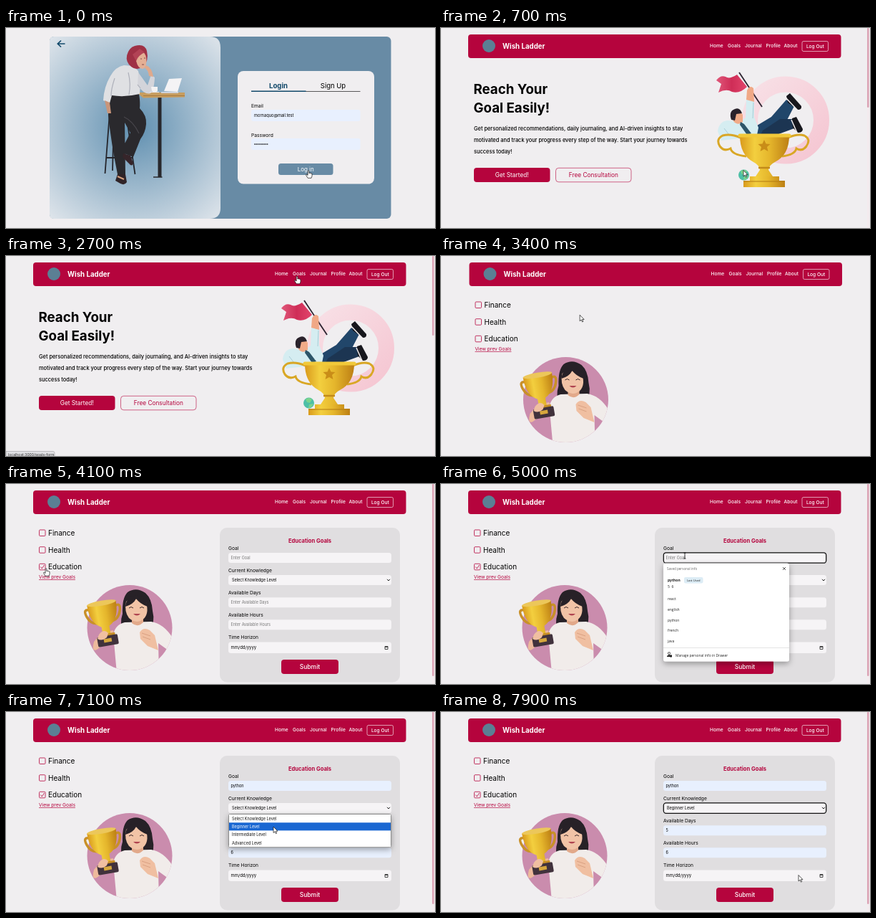
Write an HTML page that moves like this. It is 600 px wide and 279 px high and loops after 8000 ms.

```html
<!DOCTYPE html>
<html lang="en">
<head>
<meta charset="utf-8">
<title>Goal planner walkthrough</title>
<style>
html, body { margin: 0; width: 100%; height: 100%; overflow: hidden; background: #f0eef0; }
svg { display: block; width: 600px; height: 279px; }
text { font-family: Inter, Roboto, sans-serif; fill: #000; white-space: pre; }
.mid { text-anchor: middle; }
.bold { font-weight: 700; }
.nav text { fill: #fff; font-size: 6.6px; font-weight: 500; }
.nav .brand { font-size: 9.7px; font-weight: 700; }
.head { font-size: 18.7px; font-weight: 700; }
.para { font-size: 7.43px; font-weight: 500; }
.btn { font-size: 8.3px; }
.opt { font-size: 10px; }
.label { font-size: 6.65px; }
.value { font-size: 5.5px; }
.hint { fill: #777; }
.popup text { font-family: "Open Sans", "Noto Sans", sans-serif; font-size: 5px; fill: #222; }
.red { fill: #b5043d; }
.wht { fill: #fff; }
</style>
</head>
<body>
<svg viewBox="0 0 600 279">
<defs>
  <radialGradient id="glow" gradientUnits="userSpaceOnUse" cx="180.500" cy="139" r="174">
    <stop offset="0" stop-color="#5f8fb0"/><stop offset="1" stop-color="#dfe5eb"/>
  </radialGradient>
  <linearGradient id="gold">
    <stop offset="0" stop-color="#d99a1c"/><stop offset=".3" stop-color="#f3cf3f"/>
    <stop offset=".6" stop-color="#e5b62c"/><stop offset="1" stop-color="#bd7f14"/>
  </linearGradient>
  <linearGradient id="ring" x1="0" y1="0" x2="1" y2="1">
    <stop offset="0" stop-color="#f8e0e6"/><stop offset="1" stop-color="#f5c6d2"/>
  </linearGradient>
  <linearGradient id="flag">
    <stop offset="0" stop-color="#e0587a"/><stop offset=".5" stop-color="#cf2d57"/><stop offset="1" stop-color="#e2456c"/>
  </linearGradient>
  <filter id="shade" x="-10%" y="-20%" width="120%" height="150%">
    <feDropShadow dx="0" dy="3" stdDeviation="4" flood-color="#000" flood-opacity=".35"/>
  </filter>
  <clipPath id="round"><circle cx="173" cy="200.5" r="59.5"/></clipPath>
</defs>
<rect width="600" height="279" fill="#f0eef0"/>

<g id="login">
  <rect x="61" y="12" width="477.500" height="254" rx="6" fill="#688ba5"/>
  <path d="M67 12H285Q300 12 300 27V251Q300 266 285 266H67Q61 266 61 260V18Q61 12 67 12Z" fill="url(#glow)"/>
  <path d="M82.500 22H72.500M77 17.500L72.300 22L77 26.500" fill="none" stroke="#12496a" stroke-width="1.700"/>

  <!-- stool and table -->
  <path d="M145 118L138.500 203M151 120L149 199M168 120L180.500 204M141 181H177" fill="none" stroke="#25252b" stroke-width="1.800"/>
  <rect x="212.500" y="96" width="5" height="112" fill="#28282d"/>
  <path d="M206 208H218.500" stroke="#28282d" stroke-width="1.500"/>
  <path d="M183 90H250V96.500L192 97.500Z" fill="#c79d5f"/>
  <path d="M192 94.500H250" stroke="#a87b40" stroke-width="1"/>
  <!-- trousers and shoes -->
  <path d="M144 93L186 92Q188 104 187 112Q197 122 196 134Q195 146 188 155L178 180L160 173L174 146L166 132L167 204L156 204Q147 160 143 122Z" fill="#2a292d"/>
  <path d="M165 124Q178 130 186 147" fill="none" stroke="#48464c" stroke-width="1.200"/>
  <path d="M164 175L174 178L178 189Q176 194 172 189L163 180Z" fill="#36252a"/>
  <path d="M156 204H167L169 215Q166 220 160 217L153 213Z" fill="#302428"/>
  <path d="M156 207L165 211" stroke="#d6a07f" stroke-width="2"/>
  <!-- upper body -->
  <path d="M165 52Q153 54 146 67Q137 82 136 101L145 105L148 94Q166 97 187 92L188 78L185 60L178 53Z" fill="#dfe0e3"/>
  <path d="M185 62L198 80L203 65L208 69Q207 88 202 91Q194 94 184 80Z" fill="#d3d4da"/>
  <path d="M152 70Q147 85 147 95M171 62Q175 78 172 93M184 79L188 84" fill="none" stroke="#aeb0ba" stroke-width="1.200"/>
  <path d="M138 101L145 104L147 119L142 119Z" fill="#c9957a"/>
  <path d="M200 67Q199 58 193 55L196 52Q204 55 206 68Z" fill="#dfa98c"/>
  <path d="M180 25Q194 21 197 32Q200 46 192 54Q181 61 172 51Q166 43 171 33Q174 27 180 25Z" fill="#9f3145"/>
  <path d="M185 34Q194 31 196 41Q198 52 192 57Q185 58 182 46Z" fill="#e4af94"/>
  <path d="M182 46Q185 38 194 34L187 29L177 37Z" fill="#b24355"/>
  <path d="M188 43H190M193 42H195M190 51H193" stroke="#6d3036" stroke-width=".8"/>
  <!-- laptop and cup -->
  <path d="M221 88L228 71L246 70L240 89Z" fill="#f4f3f5"/>
  <path d="M217 89H241V91H217Z" fill="#cfd3da"/>
  <path d="M203 82H212V88Q207 91 204 88Z" fill="#f3f2f3"/>
  <path d="M201 89.500H214" stroke="#e8e7ea" stroke-width="1.200"/>

  <rect x="324" y="60" width="191" height="157.500" rx="8" fill="#f0eef0"/>
  <text class="mid bold" x="381" y="83.500" font-size="9.600" style="fill:#12496a">Login</text>
  <text class="mid" x="457.500" y="83.500" font-size="9.500">Sign Up</text>
  <path d="M419 88.500H495.500" stroke="#333" stroke-width=".8"/>
  <path d="M343 88.300H419.500" stroke="#12496a" stroke-width="1.500"/>
  <text class="label" x="343" y="110.500">Email</text>
  <rect x="343" y="114" width="152.500" height="16" rx="3" fill="#e8f0fe"/>
  <text x="347" y="123.500" font-size="5.700">mornaquo@mail.test</text>
  <text class="label" x="343" y="151.500">Password</text>
  <rect x="343" y="154" width="152.500" height="16" rx="3" fill="#e8f0fe"/>
  <path d="M348 162H366" stroke="#111" stroke-width="1.700" stroke-linecap="round" stroke-dasharray="0 2.200"/>
  <rect x="381" y="189" width="76.500" height="16" rx="3.500" fill="#688ba5"/>
  <text class="mid wht" x="419.200" y="200" font-size="8">Log in</text>
</g>

<g id="page">
  <g class="nav">
    <rect x="38" y="9" width="521.500" height="33" rx="4" fill="#b5043d"/>
    <circle cx="67" cy="25" r="9" fill="#5b7f94"/>
    <text class="brand" x="86" y="28.500">Wish Ladder</text>
    <text x="376" y="27.300">Home</text>
    <text x="401" y="27.300">Goals</text>
    <text x="425" y="27.300">Journal</text>
    <text x="454.500" y="27.300">Profile</text>
    <text x="479.500" y="27.300">About</text>
    <rect x="505" y="18.500" width="36.500" height="14" rx="2" fill="none" stroke="#fff" stroke-width=".6"/>
    <text class="mid" x="523.300" y="27.700">Log Out</text>
  </g>

  <g id="home">
    <text class="head" x="45.500" y="92">Reach Your</text>
    <text class="head" x="45.500" y="118.300">Goal Easily!</text>
    <text class="para" x="46" y="143">Get personalized recommendations, daily journaling, and AI-driven insights to stay</text>
    <text class="para" x="46" y="159">motivated and track your progress every step of the way. Start your journey towards</text>
    <text class="para" x="46" y="174.500">success today!</text>
    <rect x="46" y="195" width="106.500" height="20" rx="4" fill="#b5043d"/>
    <text class="mid btn wht" x="99.200" y="208">Get Started!</text>
    <rect x="160.500" y="195.300" width="105.500" height="19.500" rx="4" fill="none" stroke="#b5043d" stroke-width=".6"/>
    <text class="mid btn red" x="213.300" y="208">Free Consultation</text>

    <circle cx="482" cy="128.500" r="50" fill="none" stroke="url(#ring)" stroke-width="22"/>
    <path d="M417 62L449 110" stroke="#2c2430" stroke-width="1.800"/>
    <path d="M414 65Q403 72 398 68Q391 65 385 73L392 78L388 90Q399 84 407 89Q418 92 428 82Z" fill="url(#flag)"/>
    <!-- reclining figure -->
    <path d="M437 139L462 124L483 100L494 109L480 136L462 151H436Z" fill="#21466a"/>
    <path d="M450 143L474 127L492 127L494 140L464 151H446Z" fill="#1c3552"/>
    <path d="M483 95L488 91L504 109Q505 114 499 114L485 104Z" fill="#17171d"/>
    <path d="M482 97L499 115" stroke="#f1eef0" stroke-width="1.500"/>
    <path d="M491 126L497 124L506 141Q506 146 499 146L492 139Z" fill="#17171d"/>
    <path d="M490 128L498 146" stroke="#f1eef0" stroke-width="1.500"/>
    <path d="M401 129Q389 130 387 144L392 157L418 154H441L444 139L438 124V102L427 99L426 125L418 131Z" fill="#d5edf1"/>
    <path d="M396 140L403 149M437 104L436 126" stroke="#a9cdd7" fill="none"/>
    <path d="M427 100L428 87Q432 79 437 84L438 103Z" fill="#f0a886"/>
    <path d="M408 118Q417 113 422 121L422 131Q415 137 409 130Z" fill="#f0ab88"/>
    <path d="M406 128Q402 116 411 113Q418 110 421 119L413 120L411 129Z" fill="#2a222b"/>
    <path d="M419 131L424 134L434 147L428 149L418 135Z" fill="#2d5568"/>
    <!-- cup -->
    <path d="M419 153Q405 147 394 150Q384 155 390 165Q396 173 405 168Q407 177 427 179M485 153Q499 147 508 150Q518 155 511 165Q505 173 497 168Q495 177 477 179" fill="none" stroke="#d9a725" stroke-width="3"/>
    <path d="M418 150H487Q487 177 467 187Q459 191 458 198L464 207H440L446 198Q445 191 437 187Q418 177 418 150Z" fill="url(#gold)"/>
    <rect x="415.500" y="147.500" width="74" height="5" rx="2.500" fill="#f1c93a"/>
    <path d="M452 156L454.500 161.500L460.500 162L456 166L457.500 172L452 169L446.500 172L448 166L443.500 162L449.500 161.500Z" fill="#c98d18"/>
    <path d="M444 195H460" stroke="#c28a1a" stroke-width="2.500"/>
    <path d="M432 207H473V213H481V222H423V213H432Z" fill="url(#gold)"/>
    <path d="M423 214H481" stroke="#b27a13" stroke-width="1"/>
    <circle cx="423.500" cy="205" r="7.500" fill="#4dbfa6"/>
    <path d="M419 200Q424 196 428 200L425 205L421 204ZM424 207L430 206L427 211L423 212Z" fill="#7cd38c"/>
  </g>

  <g id="goals">
    <g fill="none" stroke="#b5043d" stroke-width=".8">
      <rect x="46.500" y="64" width="8.500" height="8.500" rx="1.200"/>
      <rect x="46.500" y="87.700" width="8.500" height="8.500" rx="1.200"/>
      <rect x="46.500" y="111.300" width="8.500" height="8.500" rx="1.200"/>
      <path id="tick" d="M48.300 115.500L50.300 118L53.500 113"/>
    </g>
    <text class="opt" x="59" y="71.800">Finance</text>
    <text class="opt" x="59" y="95.500">Health</text>
    <text class="opt" x="59" y="119">Education</text>
    <text class="label red" x="46" y="132.300" text-decoration="underline">View prev Goals</text>

    <g clip-path="url(#round)">
      <rect x="113" y="141" width="120" height="120" fill="#ca8cad"/>
      <path d="M170 151Q182 143 195 152Q204 160 205 177Q209 193 201 204H165Q158 196 163 181Q162 159 170 151Z" fill="#272127"/>
      <path d="M166 193Q153 196 150 210L155 264H214L213 222L231 235L235 218Q222 195 203 192Z" fill="#f1ecea"/>
      <path d="M176 183H192V193Q184 201 176 194Z" fill="#e2a98a"/>
      <path d="M168 164Q182 156 196 165Q201 183 190 190Q181 195 172 187Q165 178 168 164Z" fill="#f1c3a6"/>
      <path d="M167 171Q168 157 183 155Q196 157 198 171Q187 167 182 160Q178 168 167 171Z" fill="#272127"/>
      <path d="M172 173Q175 170 178 173M187 173Q190 170 193 173" fill="none" stroke="#3c2928" stroke-width="1"/>
      <path d="M178 181Q183 186 188 181Z" fill="#b04450"/>
      <path d="M151 214L127 231Q119 235 123 220L134 207L150 204Z" fill="#edba9c"/>
      <path d="M187 207Q192 199 201 204L208 211L213 232L198 226L188 216Z" fill="#f0bfa1"/>
      <path d="M190 208L202 212M191 213L202 217" stroke="#d39a7c" stroke-width=".8"/>
    </g>
    <g transform="rotate(-10 137 190)">
      <path d="M120 173Q110 169 114 181Q118 193 129 193M155 173Q165 169 161 181Q157 193 146 193" fill="none" stroke="#c89029" stroke-width="3.500"/>
      <path d="M117 166H158Q158 192 143 199V211H132V199Q117 192 117 166Z" fill="url(#gold)"/>
      <ellipse cx="137.500" cy="166" rx="20.500" ry="3.500" fill="#ecc75a"/>
      <path d="M127 209H149V214H127Z" fill="#c78e25"/>
      <rect x="123" y="212" width="29" height="14" rx="2" fill="#41323c"/>
      <rect x="132" y="216" width="11" height="5" fill="#d6a73d"/>
    </g>
    <path d="M130 210Q137 201 143 208L141 214Q134 220 128 216Z" fill="#f0bfa1"/>

    <g id="form">
      <rect x="299" y="61" width="252" height="215.500" rx="10" fill="#e0dee0"/>
      <text class="mid bold red" x="425" y="82" font-size="7.600">Education Goals</text>
      <g id="fields"></g>
      <path d="M533 132.800L535 135L537 132.800" fill="none" stroke="#222" stroke-width="1"/>
      <path d="M530 226.500H534V230.500H530ZM530 227.500H534" fill="none" stroke="#222" stroke-width=".8"/>
      <rect x="385" y="245" width="80" height="20" rx="4" fill="#b5043d"/>
      <text class="mid wht" x="425" y="258" font-size="8.500" font-weight="500">Submit</text>
      <rect id="focus" x="311.300" y="95.800" width="227.400" height="14.400" rx="3.500" fill="none" stroke="#111" stroke-width="1.300"/>
    </g>

    <g id="saved" class="popup">
      <rect x="311" y="110.500" width="176" height="137" rx="3" fill="#fff" filter="url(#shade)"/>
      <rect id="hover" x="312" y="126" width="174" height="22" fill="#eeeef0"/>
      <text x="316" y="119.800" style="font-size:4.600px;fill:#666">Saved personal info</text>
      <path d="M478 116L482 120M482 116L478 120" stroke="#333" stroke-width=".8"/>
      <text class="bold" x="317" y="136">python</text>
      <rect x="340" y="130" width="26.500" height="8.500" rx="2" fill="#dcecf5"/>
      <text class="mid" x="353.300" y="135.900" style="font-size:4.100px">Last Used</text>
      <text x="317" y="144.500">5  6</text>
      <g id="history"></g>
      <path d="M311 228.500H487" stroke="#ddd" stroke-width=".8"/>
      <circle cx="319" cy="236.300" r="1.600" fill="none" stroke="#222" stroke-width=".8"/>
      <path d="M316 241V240Q319 237 321 239.500V241Z" fill="#222"/>
      <rect x="320" y="238.500" width="3" height="3" fill="#222"/>
      <text x="328" y="240.700" style="font-size:4.900px">Manage personal info in Drawer</text>
    </g>

    <g id="levels">
      <rect id="levelBox" x="311.500" y="142.500" width="227" height="46" rx="2" stroke="#777" stroke-width=".8" filter="url(#shade)"/>
      <g id="levelRows"></g>
    </g>
  </g>
</g>

<g id="bar">
  <rect x="596" width="3" height="279" fill="#f3ebee"/>
  <rect id="thumb" x="596" width="2.600" height="111" rx="1.300" fill="#dca5b6"/>
</g>
<g id="status">
  <path d="M0 272.500H66Q68 272.500 68 275V279.500H0Z" fill="#dfdfe2" stroke="#a9a9ad" stroke-width=".7"/>
  <text x="3" y="278.500" font-size="5.100" style="fill:#333">localhost:3000/goals-form</text>
</g>

<g id="cursor">
  <path id="arrow" d="M0 0V8.500L2 6.700L3.400 9.700L4.700 9.100L3.400 6.200H6Z" fill="#fff" stroke="#111" stroke-width=".7"/>
  <path id="hand" d="M-.9 .8Q0-.8 .9 .8V4L2.200 3.800L3.500 4.200L5 4.800V8L4 10.800H-.8L-3.300 7Q-3.700 5.400-2.200 5.900L-.9 7Z" fill="#fff" stroke="#111" stroke-width=".7"/>
  <path id="beam" d="M-1.500-4H1.500M0-4V4M-1.500 4H1.500" fill="none" stroke="#111" stroke-width=".8"/>
</g>
</svg>

<script>
const $ = id => document.getElementById(id);
const LOOP = 8000, STEP = 100;

// Moments at which the state changes, in ms
const T = {
  home: 500, status: 2100, goals: 3000, form: 3900, focus: 4900,
  hover: 5300, fill: 5600, open: 6400, list: 6500, chosen: 7200
};

// Pointer keys: time, x, y
const PATH = [
  [0, 423, 198.5], [1000, 423, 198.5], [1600, 398, 23], [1800, 397, 23],
  [2200, 407, 28], [3000, 407, 28], [3700, 56, 117.5], [4200, 56, 117.5],
  [4800, 341, 100], [5000, 341, 100], [5300, 327, 136], [5600, 327, 136],
  [6200, 388, 134], [6500, 388, 134], [6900, 374, 160], [7200, 374, 160],
  [7700, 500, 227.5], [8000, 500, 227.5]
];
// Pointer shapes: start time, id
const SHAPES = [
  [0, 'hand'], [500, 'arrow'], [1500, 'hand'], [3000, 'arrow'],
  [3600, 'hand'], [4300, 'arrow'], [4700, 'beam'], [5200, 'arrow']
];
const FIELDS = [
  ['Goal', 'Enter Goal', 'python'],
  ['Current Knowledge', 'Select Knowledge Level', 'Beginner Level'],
  ['Available Days', 'Enter Available Days', '5'],
  ['Available Hours', 'Enter Available Hours', '6'],
  ['Time Horizon', 'mm/dd/yyyy', '']
];
const LEVELS = ['Select Knowledge Level', 'Beginner Level', 'Intermediate Level', 'Advanced Level'];

function add(parent, tag, attrs, text) {
  const el = document.createElementNS('http://www.w3.org/2000/svg', tag);
  for (const key in attrs) el.setAttribute(key, attrs[key]);
  if (text) el.textContent = text;
  return parent.appendChild(el);
}

const inputs = FIELDS.map(([label, hint], i) => {
  const y = 96 + 31.1 * i, box = $('fields');
  add(box, 'text', { class: 'label', x: 311, y: y - 4 }, label);
  return {
    rect: add(box, 'rect', { x: 311, y, width: 228, height: i === 4 ? 15.5 : 14, rx: 3.5 }),
    text: add(box, 'text', { class: 'value', x: i === 1 ? 316 : 314.5, y: y + (i === 4 ? 9.6 : 8.9) }, hint)
  };
});
inputs[4].text.style.fontSize = '6px';

['react', 'english', 'python', 'french', 'java'].forEach((word, i) =>
  add($('history'), 'text', { x: 317, y: 162 + 14.8 * i }, word));

const rows = LEVELS.map((name, i) => {
  const y = 143 + 11.3 * i;
  const rect = add($('levelRows'), 'rect', { x: 312, y, width: 226, height: 11.3 });
  const text = add($('levelRows'), 'text', { class: 'value', x: 316, y: y + 7.6 }, name);
  return { rect, text };
});

const show = (id, on) => { $(id).style.display = on ? '' : 'none'; };

function pointAt(t) {
  const i = PATH.findIndex(key => key[0] > t);
  const [t0, x0, y0] = PATH[i - 1], [t1, x1, y1] = PATH[i];
  const p = (t - t0) / (t1 - t0), e = p * p * (3 - 2 * p);
  return [x0 + (x1 - x0) * e, y0 + (y1 - y0) * e];
}

function drawFields(t) {
  const filled = t >= T.fill;
  inputs.forEach(({ rect, text }, i) => {
    const done = i === 1 ? t >= T.chosen : filled && i < 4;
    rect.setAttribute('fill', done && i !== 1 ? '#e8f0fe' : '#f6f4f6');
    text.textContent = FIELDS[i][done ? 2 : 1];
    text.classList.toggle('hint', !done && i !== 1 && i !== 4);
  });
  const onSelect = t >= T.chosen;
  show('focus', onSelect || (t >= T.focus && t < T.open - 200));
  $('focus').setAttribute('y', onSelect ? 126.9 : 95.8);
}

function drawLevels(t, y) {
  const ready = t >= T.list;
  show('levels', t >= T.open && t < T.chosen);
  show('levelRows', ready);
  $('levelBox').setAttribute('fill', ready ? '#fff' : 'rgba(225,223,226,.3)');
  const active = Math.max(0, Math.floor((y - 143) / 11.3));
  rows.forEach(({ rect, text }, i) => {
    rect.setAttribute('fill', i === active ? '#1967d2' : '#fff');
    text.style.fill = i === active ? '#fff' : '#111';
  });
}

function render(t) {
  const [x, y] = pointAt(t);
  const onHome = t >= T.home && t < T.goals, hasForm = t >= T.form;
  show('login', t < T.home);
  show('page', t >= T.home);
  show('home', onHome);
  show('goals', t >= T.goals);
  show('form', hasForm);
  show('tick', hasForm);
  show('bar', onHome || hasForm);
  show('status', t >= T.status && t < T.goals);
  show('saved', t >= T.focus && t < T.fill);
  show('hover', t >= T.hover);
  $('thumb').setAttribute('height', onHome ? 111 : 268);
  // The page re-centres when there is no scrollbar
  $('page').setAttribute('transform', `translate(${onHome || hasForm ? 0 : 1.5} 0)`);
  drawFields(t);
  drawLevels(t, y);
  const shape = SHAPES.filter(s => s[0] <= t).pop()[1];
  ['arrow', 'hand', 'beam'].forEach(id => show(id, id === shape));
  $('cursor').setAttribute('transform', `translate(${x} ${y})`);
}

const start = performance.now();
function tick() {
  const t = (performance.now() - start) % LOOP;
  render(Math.floor(t / STEP) * STEP);
  requestAnimationFrame(tick);
}
tick();
</script>
</body>
</html>
```
